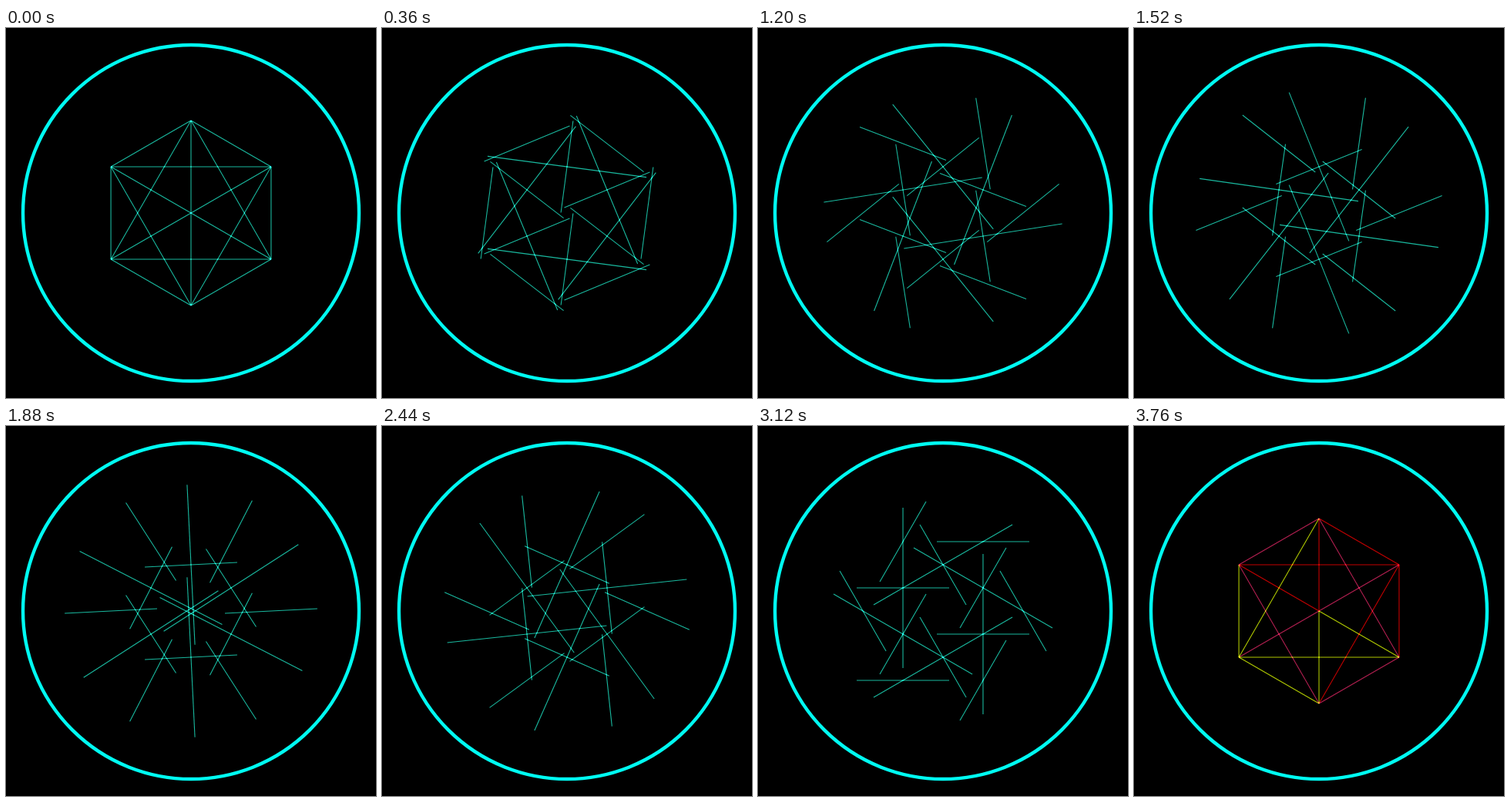
An HTML page with a canvas for the animation above (3.8 s loop, 480x480 px).

```html
<!DOCTYPE html>
<html lang="en">
<head>
<meta charset="utf-8">
<title>Turning hexagon</title>
<style>
  html, body { margin: 0; width: 100%; height: 100%; overflow: hidden; background: #000; }
  canvas { display: block; width: 480px; height: 480px; }
</style>
</head>
<body>
<canvas id="stage" width="480" height="480"></canvas>
<script>
const ctx = document.getElementById('stage').getContext('2d');
const LOOP = 3800, STEP = 40, FLASH = 3760;
const MID = 240, R = 120, H = R * Math.sqrt(3) / 2;
const RAD = Math.PI / 180;
const TEAL = 'rgb(24,184,158)';
const FLASH_COLORS = { R: 'rgb(195,0,0)', Y: 'rgb(175,200,0)', M: 'rgb(180,30,80)' };

// Each family: distance of the midpoints, first angle, own tilt, half length, flash colours
const FAMILIES = [
  [H, 0, 90, R / 2, 'RMYYMR'],
  [R / 2, 30, 0, R / 2, 'YYMRRM'],
  [R / 2, 30, 90, H, 'RYMYRM']
];

const lines = FAMILIES.flatMap(([dist, first, tilt, half, colors]) =>
  [...colors].map((c, k) => {
    const a = first + 60 * k;
    return {
      x: MID + dist * Math.cos(a * RAD),
      y: MID + dist * Math.sin(a * RAD),
      dir: a + tilt,
      half,
      flash: FLASH_COLORS[c]
    };
  }));

// Time in ms, rotation in degrees, easing into this step
const linear = p => p;
const easeIn = p => p * p;
const easeOut = p => p * (2 - p);
const TURN = [
  [0, 0],
  [450, 11.8, easeIn],
  [680, 23.85, linear],
  [1200, 51.1, linear],
  [1880, 87.2, linear],
  [2440, 113.9, linear],
  [3120, 150, linear],
  [3600, 175.2, linear],
  [3760, 180, easeOut]
];

function turnAt(t) {
  const i = TURN.findIndex(s => s[0] > t);
  if (i < 0) return 180;
  const [t0, v0] = TURN[i - 1];
  const [t1, v1, ease] = TURN[i];
  return v0 + (v1 - v0) * ease((t - t0) / (t1 - t0));
}

function drawRing() {
  ctx.strokeStyle = '#00fbf2';
  ctx.lineWidth = 4.4;
  ctx.beginPath();
  ctx.arc(MID, MID, 218, 0, 2 * Math.PI);
  ctx.stroke();
}

function drawLine({ x, y, dir, half, flash }, turn, flashing) {
  const dx = half * Math.cos((dir + turn) * RAD);
  const dy = half * Math.sin((dir + turn) * RAD);
  ctx.strokeStyle = flashing ? flash : TEAL;
  ctx.beginPath();
  ctx.moveTo(x - dx, y - dy);
  ctx.lineTo(x + dx, y + dy);
  ctx.stroke();
}

function draw(t) {
  ctx.globalCompositeOperation = 'source-over';
  ctx.fillStyle = '#000';
  ctx.fillRect(0, 0, 480, 480);
  drawRing();
  ctx.globalCompositeOperation = 'lighter';
  ctx.lineWidth = 1.1;
  const turn = turnAt(t);
  for (const line of lines) drawLine(line, turn, t >= FLASH);
}

let start;
function tick(now) {
  start ??= now;
  const t = Math.max(0, now - start) % LOOP;
  draw(Math.floor(t / STEP) * STEP);
  requestAnimationFrame(tick);
}
draw(0);
requestAnimationFrame(tick);
</script>
</body>
</html>
```
